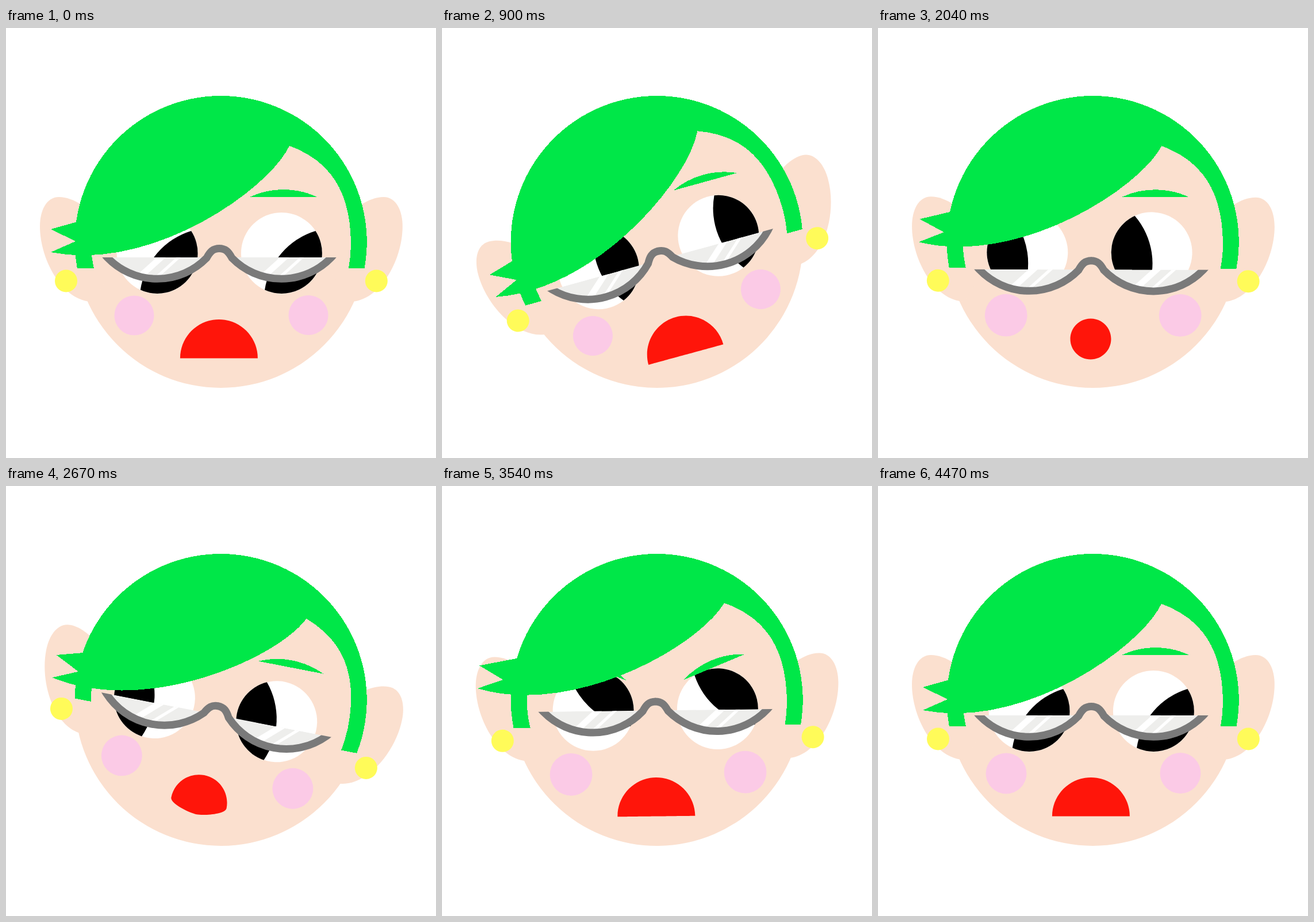
An HTML page for the animation above (4.5 s loop, 748 by 748 pixels).

```html
<!DOCTYPE html>
<html lang="en">
<head>
<meta charset="utf-8">
<title>Face</title>
<style>
  html, body { margin: 0; width: 100%; height: 100%; overflow: hidden; background: #fff; }
  svg { display: block; width: 100%; height: 100%; }
  .skin { fill: #fbe0cf; }
  .hair { fill: #00e748; shape-rendering: crispEdges; }
  .cheek { fill: #fbcae6; }
  .earring { fill: #fffb59; }
</style>
</head>
<body>
<svg viewBox="0 0 748 748">
  <defs>
    <g id="ear">
      <path class="skin" d="M132,308C118,299 105,294 92,294C70,294 59,318 59,345C59,405 100,476 150,476L200,400Z"/>
      <circle class="earring" cx="104.5" cy="440" r="19.5"/>
    </g>
    <g id="eye">
      <circle r="70.5" fill="#fff"/>
      <path d="M19.55,-67.7A70.5,70.5 0 0 1 19.55,67.7A127,127 0 0 1 19.55,-67.7Z"/>
    </g>
    <path id="browShape" class="hair" d="M-57.5,0A138.5,138.5 0 0 1 57.5,0Z"/>
    <g id="lens">
      <path fill="#eeeeec" d="M176,399A120,120 0 0 0 349,399Z"/>
      <path fill="#fff" d="M262,399h16l-40,36h-16ZM296.5,399h7.5l-40,36h-7.5Z"/>
    </g>
    <path id="rim" fill="none" stroke="#7a7a7a" stroke-width="13"
      d="M168,390L176,399A120,120 0 0 0 349,400C355,389 360,383.5 371.5,383.5"/>
    <clipPath id="halfMoon"><path d="M0,399H300V300H442V399H748V600H0Z"/></clipPath>
  </defs>
  <g id="head">
    <circle class="skin" cx="373.7" cy="372" r="254"/>
    <use href="#ear"/>
    <use href="#ear" transform="translate(748.8)scale(-1,1)"/>
    <circle class="cheek" cx="223" cy="500" r="35"/>
    <circle class="cheek" cx="526" cy="499.5" r="35"/>
    <path id="mouth" fill="#ff150a"/>
    <use class="eye" href="#eye" data-x="261.7"/>
    <use class="eye" href="#eye" data-x="478"/>
    <use class="brow" href="#browShape"/>
    <g transform="translate(742)scale(-1,1)"><use class="brow" href="#browShape"/></g>
    <path class="hair" d="M123.9,418A254,254 0 1 1 623.5,418H596C598,405 600,392 600,378C600,275 556,228 493,205L148,340V378C148,392 150,405 153,418Z"/>
    <path id="bang" class="hair" d="M493,205C455,284 250,425 78,390L121,371L78,350L124,337L180,321V300Z"/>
    <g id="glasses"><g clip-path="url(#halfMoon)">
      <use href="#lens"/>
      <use href="#lens" x="214.5"/>
      <use href="#rim"/>
      <use href="#rim" transform="translate(742)scale(-1,1)"/>
    </g></g>
  </g>
</svg>
<script>
const LOOP = 4500;
const byId = id => document.getElementById(id);
const place = (el, transform) => el.setAttribute('transform', transform);
const all = selector => document.querySelectorAll(selector);
const eyes = all('.eye'), brows = all('.brow'), cheeks = all('.cheek');
const mix = (a, b, p) => a + (b - a) * p;

// Morphs from a half disc (0) to a full disc (1).
function mouthPath(p) {
  const x = 370.4, w = mix(67.5, 35.5, p), y = mix(574.5, 541, p);
  const top = mix(507, 505.5, p), bottom = mix(574.5, 576.5, p);
  const upper = mix(37.3, 19.6, p), lower = 19.6 * p;
  const l = x - w, r = x + w;
  return `M${l},${y}C${l},${y - upper} ${x - upper},${top} ${x},${top}` +
    `C${x + upper},${top} ${r},${y - upper} ${r},${y}` +
    `C${r},${y + lower} ${x + lower},${bottom} ${x},${bottom}` +
    `C${x - lower},${bottom} ${l},${y + lower} ${l},${y}Z`;
}

function cheekRadius(t) {
  const u = t % 300 / 300;
  const triangle = 1 - Math.abs(1 - 2 * u);
  const wave = (1 - Math.cos(2 * Math.PI * u)) / 2;
  return 34.5 + 6.5 * (triangle + wave) / 2;
}

function draw(now) {
  const t = now % LOOP;
  const ease = (start, length = 270) => {
    const u = Math.min(1, Math.max(0, (t - start) / length));
    return u * u * (3 - 2 * u);
  };
  const hold = (start, end) => ease(start) - ease(end);
  const swing = start => ease(start, 180) - ease(start + 180, 240);

  // The face looks up, then aside, then scowls, then rests.
  const lookUp = 800, lookAside = 1740, turn = 1890, scowl = 3270, rest = 4190;

  const tilt = -15.4 * hold(120, turn) + 11 * hold(turn, scowl) - 0.7 * swing(scowl + 90);
  const flick = 4 * swing(120) + 3.1 * swing(turn + 30) + 8.3 * swing(scowl);
  const gaze = 40.7 - 150.3 * ease(lookUp) - 79.1 * ease(lookAside)
    + 138.7 * ease(scowl - 120) + 90.7 * ease(rest);
  const frown = hold(scowl, rest);
  const drop = 21.3 * hold(lookUp + 20, 2250) - 8.6 * frown;
  const lift = 18.7 * hold(1060, lookAside);

  place(byId('head'), `rotate(${tilt} 373.7 372)`);
  place(byId('bang'), `rotate(${flick} 493 205)`);
  place(byId('glasses'), `translate(0 ${drop})`);
  for (const eye of eyes)
    place(eye, `translate(${eye.dataset.x} 390.3)rotate(${gaze})translate(1.9)`);
  for (const brow of brows)
    place(brow, `translate(${482.5 - 8 * frown} ${293.5 + 22.5 * frown - lift})rotate(${-22 * frown})`);
  for (const cheek of cheeks) cheek.setAttribute('r', cheekRadius(t));
  byId('mouth').setAttribute('d', mouthPath(hold(900, 2550)));
}

const start = performance.now();
function tick() {
  draw(performance.now() - start);
  requestAnimationFrame(tick);
}
tick();
</script>
</body>
</html>
```
